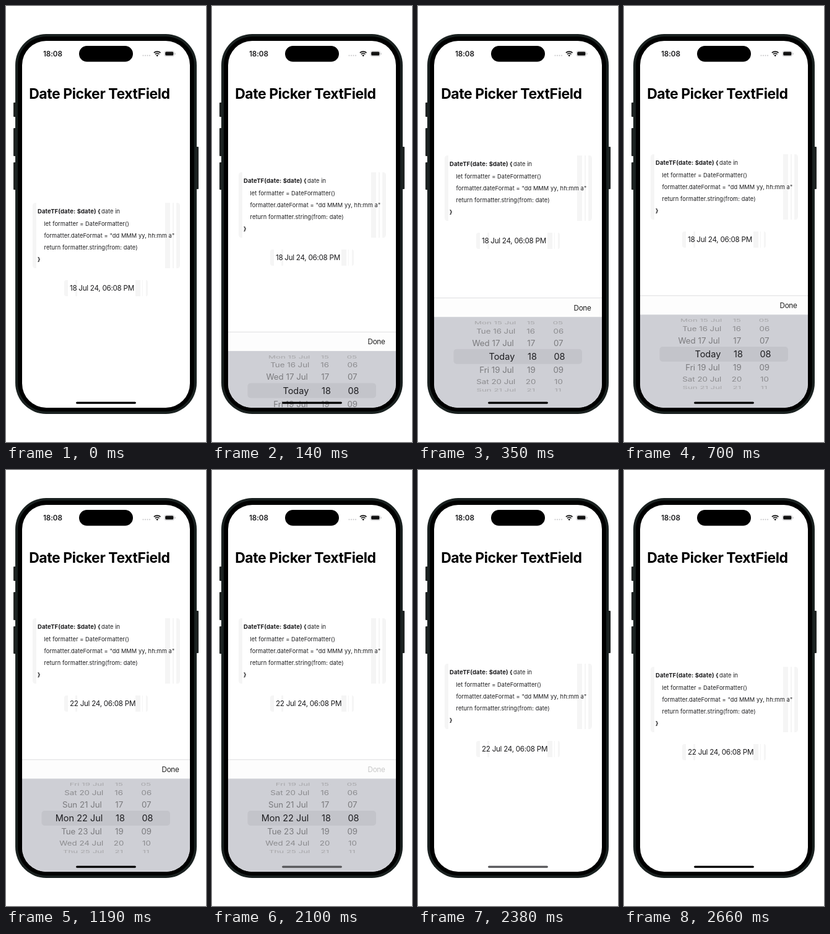
Recreate the animation shown at these times as an HTML page. Size 323 px wide and 700 px high, loop 2.84 s.

```html
<!DOCTYPE html>
<html lang="en">
<head>
<meta charset="utf-8">
<title>Date Picker TextField</title>
<style>
  html, body { margin: 0; width: 100%; height: 100%; overflow: hidden; background: #fff; }
  svg { display: block; font-family: Inter, "Liberation Sans", sans-serif; fill: #1c1c1e; }
  text { white-space: pre; }
  .title { font-size: 23px; font-weight: 700; letter-spacing: -.43px; fill: #000; }
  .clock { font-size: 11.7px; font-weight: 600; letter-spacing: -.1px; }
  .code { font-size: 9.28px; letter-spacing: .09px; }
  .strong { font-size: 9.5px; font-weight: 700; letter-spacing: .12px; }
  .body { font-size: 11.7px; letter-spacing: -.3px; }
  .wheel text { text-anchor: middle; }
  .wheel text.day { text-anchor: end; }
</style>
</head>
<body>
<svg width="323" height="700" viewBox="0 0 323 700">
  <defs>
    <clipPath id="screen"><rect x="26" y="56" width="271" height="589" rx="39"/></clipPath>
  </defs>

  <!-- phone -->
  <g fill="#202423">
    <rect x="12" y="155" width="5" height="23" rx="1"/>
    <rect x="12" y="196" width="5" height="45" rx="1"/>
    <rect x="12" y="251" width="5" height="44" rx="1"/>
    <rect x="306" y="226" width="5" height="68" rx="1"/>
  </g>
  <rect x="15" y="45" width="293" height="610" rx="50" fill="#1a2120"/>
  <rect x="19" y="49" width="285" height="602" rx="46" fill="#000"/>
  <rect x="26" y="56" width="271" height="589" rx="39" fill="#fff"/>

  <!-- status bar -->
  <rect x="118" y="64" width="87" height="25.6" rx="12.8" fill="#000"/>
  <text class="clock" x="60" y="81">18:08</text>
  <g fill="#c4c4c6">
    <circle cx="221.5" cy="79.5" r="1"/><circle cx="225" cy="79.5" r="1"/>
    <circle cx="228.5" cy="79.5" r="1"/><circle cx="232" cy="79.5" r="1"/>
  </g>
  <g fill="none" stroke="#111" stroke-width="1.7">
    <path d="M238.9 75.2a7.6 7.6 0 0 1 10.6 0"/>
    <path d="M240.9 77.5a4.7 4.7 0 0 1 6.6 0"/>
  </g>
  <path d="M242.4 79.2a2.6 2.6 0 0 1 3.6 0L244.2 81.2z" fill="#111"/>
  <rect x="256" y="72.4" width="15.6" height="8.4" rx="2.6" fill="none" stroke="#c6c6c8" stroke-width=".8"/>
  <rect x="257.2" y="73.6" width="13.2" height="6" rx="1.6" fill="#111"/>
  <rect x="272.6" y="75.2" width="1" height="2.8" rx=".5" fill="#b4b4b6"/>

  <text class="title" x="37.2" y="149">Date Picker TextField</text>

  <g clip-path="url(#screen)">
    <g id="content">
      <g fill="#f5f5f5">
        <path d="M49 316h-1q-5 0-5 5v95q0 5 5 5h1z"/>
        <rect x="257" y="316" width="8" height="105"/>
        <rect x="269" y="316" width="2" height="105"/>
        <path d="M275 316h1q5 0 5 5v95q0 5-5 5h-1z"/>
        <path d="M100 440h-2q-4 0-4 4v18q0 4 4 4h2z"/>
        <rect x="112" y="440" width="3" height="26"/>
        <rect x="209" y="440" width="8" height="26"/>
        <rect x="220" y="440" width="1" height="26"/>
        <path d="M226 440q3 0 3 4v18q0 4-3 4z"/>
      </g>
      <text class="code strong" x="51" y="333.3">DateTF(date: $date) {</text>
      <text class="code" x="154" y="333.3">date in</text>
      <text class="code" x="61.5" y="352.6">let formatter = DateFormatter()</text>
      <text class="code" x="61.5" y="371.8">formatter.dateFormat = "dd MMM yy, hh:mm a"</text>
      <text class="code" x="61.5" y="391">return formatter.string(from: date)</text>
      <text class="code strong" x="51" y="410.2">}</text>
      <text class="body" id="value" x="103" y="457.2"></text>
    </g>

    <!-- keyboard, with its top edge at y = 0 -->
    <g id="keyboard">
      <rect x="26" y="0" width="271" height="31" fill="#fdfdfd"/>
      <rect x="26" y="-.5" width="271" height="1" fill="#dedee0"/>
      <text class="body" id="done" x="251.5" y="20">Done</text>
      <rect x="26" y="30.5" width="271" height="160" fill="#cecfd5"/>
      <rect x="57.5" y="82" width="207.5" height="24" rx="5" fill="#c3c4ca"/>
      <g class="wheel" id="wheel"></g>
    </g>
    <rect id="home" x="113" y="635.4" width="97" height="3.4" rx="1.7"/>
  </g>
</svg>

<script>
const LOOP = 2840, STEP = 70;
const TOP = 465, TRAVEL = 193, LIFT = 78;
const RADIUS = 60, ROW_ANGLE = 21.2 * Math.PI / 180, WHEEL_Y = 94;
const WEEK = ['Sun', 'Mon', 'Tue', 'Wed', 'Thu', 'Fri', 'Sat'];
const FADE = [30, 122, 138, 166, 200];

const el = id => document.getElementById(id);
const pad = n => String(n).padStart(2, '0');
const lerp = (a, b, k) => a + (b - a) * k;
const dayName = d => d === 18 ? 'Today' : `${WEEK[d % 7]} ${d} Jul`;

// critically damped spring, 0 to 1
function spring(ms) {
  const x = Math.max(0, ms) * 0.0164;
  return 1 - (1 + x) * Math.exp(-x);
}

// drift: sideways shift of a row by its distance from the middle
function makeColumn(name, first, last, label, x, drift) {
  const rows = [];
  for (let n = first; n <= last; n++) {
    const node = document.createElementNS('http://www.w3.org/2000/svg', 'text');
    node.setAttribute('class', name);
    node.textContent = label(n);
    el('wheel').append(node);
    rows.push({ n, node });
  }
  return { rows, x, drift };
}

const days = makeColumn('day', 14, 26, dayName, 156.3, [0, -1.5, 1, 2]);
const hours = makeColumn('num', 15, 21, pad, 184.5, [0, -1.7, -2.4, -2.2]);
const minutes = makeColumn('num', 5, 11, pad, 228.5, [0, -1.8, -1.6, -2.6]);

function turn(column, value) {
  for (const { n, node } of column.rows) {
    const delta = n - value, dist = Math.abs(delta), angle = delta * ROW_ANGLE;
    const shown = dist < 3.6;
    node.style.display = shown ? '' : 'none';
    if (!shown) continue;
    const i = Math.min(3, Math.floor(dist)), k = dist - i;
    const x = column.x + lerp(column.drift[i], column.drift[Math.min(3, i + 1)], k);
    const y = WHEEL_Y + RADIUS * Math.sin(angle);
    const size = lerp(14.5, 13.3, Math.min(1, dist));
    const gray = Math.round(lerp(FADE[i], FADE[i + 1], k));
    node.setAttribute('transform',
      `translate(${x} ${y}) scale(1 ${Math.cos(angle)}) translate(0 ${size * 0.36})`);
    node.setAttribute('font-size', size);
    node.style.fill = `rgb(${gray},${gray},${gray + 3})`;
  }
}

function draw(now) {
  const t = Math.floor(now % LOOP / STEP) * STEP;
  const closing = t >= 2100;
  let lift, rise;
  if (closing) {
    lift = rise = 1 - spring(t - 2110);
  } else {
    lift = t > 560 ? 1 : spring(t - 10);
    rise = t > 560 ? 1 : spring(t + 8);
  }
  const away = t < 70 || t >= 2660;
  if (away) lift = rise = 0;

  el('content').setAttribute('transform', `translate(0 ${-LIFT * lift})`);
  el('keyboard').setAttribute('transform', `translate(0 ${TOP + TRAVEL * (1 - rise)})`);
  el('keyboard').style.display = away ? 'none' : '';

  turn(days, t < 840 ? 18 : t < 910 ? 20.5 : 22);
  el('value').textContent = `${t < 1120 ? 18 : 22} Jul 24, 06:08 PM`;

  const tint = closing ? Math.max(30, 200 - (t - 2100) * 0.6) : 30;
  el('done').style.fill = `rgb(${tint},${tint},${tint})`;
  el('home').style.fill = closing && !away ? '#555558' : '#000';
}

turn(hours, 18);
turn(minutes, 8);

const start = performance.now();
function tick() {
  draw(performance.now() - start);
  requestAnimationFrame(tick);
}
tick();
</script>
</body>
</html>
```
